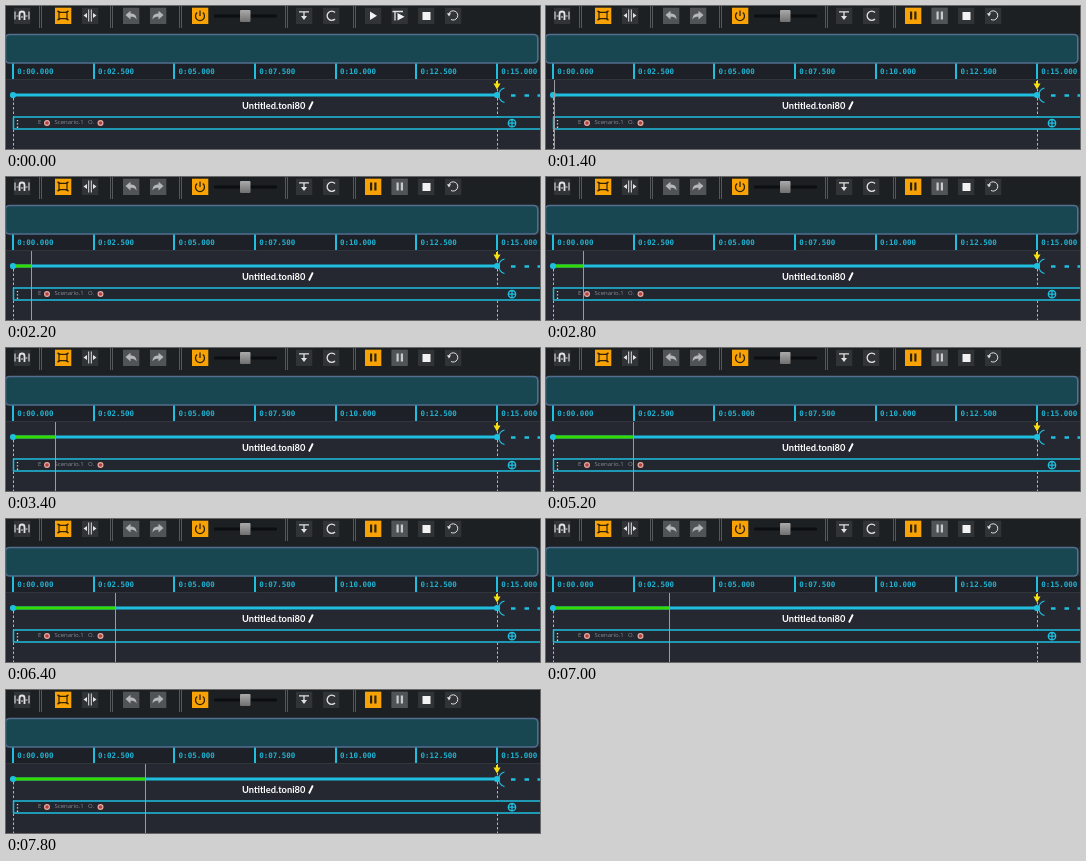
An HTML page for the animation above (8000 ms loop, 534 by 143 pixels).

```html
<!DOCTYPE html>
<html lang="en">
<head>
<meta charset="utf-8">
<title>Timeline playback</title>
<style>
  html, body { margin: 0; width: 100%; height: 100%; overflow: hidden; background: #252831; }
  svg { display: block; width: 534px; height: 143px; }
  .ruler { font: bold 7.5px "DejaVu Sans Mono", monospace; fill: #1fb4d4; }
  .title { font: bold 9.3px Lato, sans-serif; fill: #fff; }
  .tag { font: 6px "Open Sans", sans-serif; fill: #8b8e93; }
  .cyan { stroke: #1fbfe0; fill: none; }
  .light { stroke: #e2e2e2; fill: none; }
  .dark { stroke: #302408; fill: none; }
  .guide { stroke: #b4b7ba; stroke-dasharray: 2.5 2; }
</style>
</head>
<body>
<svg viewBox="0 0 534 143">
  <defs>
    <linearGradient id="knob" x2="0" y2="1">
      <stop stop-color="#aaa"/><stop offset="1" stop-color="#707070"/>
    </linearGradient>
  </defs>

  <rect width="534" height="28" fill="#1c2023"/>
  <g id="separators" stroke="#54585b"></g>
  <g id="buttons"></g>

  <!-- toolbar icons, each centred on its button -->
  <g transform="translate(16 9.5)" class="light">
    <path d="M-2.500 4.500V-1.500a2.500 2.500 0 0 1 5 0V4.500" stroke-width="1.800"/>
    <path d="M-7-4V4M7-4V4M-5.500 0.500h2M3.500 0.500h2M-1 1.500h2" stroke-width="1.100"/>
  </g>
  <g transform="translate(57 9.500)" class="dark">
    <path d="M-4-3.200H4V3.200H-4Z" stroke-width="1.200"/>
    <path d="M-5.500-4.500L-3-3.200M5.500-4.500L3-3.200M-5.500 4.500L-3 3.200M5.500 4.500L3 3.200" stroke-width="1.500"/>
  </g>
  <g transform="translate(84 9.500)">
    <path d="M-1.300-6V6M1.300-6V6" class="light"/>
    <path d="M-3-2.500V2.500L-6.500 0ZM3-2.500V2.500L6.500 0Z" fill="#e2e2e2"/>
  </g>
  <g fill="#b5b7b9">
    <path d="M119.500 9l5-4.200v2.600c4 0 6 2 6 6c-1.500-2.200-3-2.700-6-2.700v2.800Z"/>
    <path d="M157.500 9l-5-4.200v2.600c-4 0-6 2-6 6c1.500-2.200 3-2.700 6-2.700v2.800Z"/>
  </g>
  <path d="M191.200 6.600a4.500 4.500 0 1 0 5.600 0M194 4.500V10" class="dark" stroke-width="1.300"/>
  <rect x="208" y="8.500" width="63" height="3" rx="1" fill="#0c0e10"/>
  <rect x="234" y="4" width="10.500" height="12" rx="1" fill="url(#knob)"/>
  <g transform="translate(298 9.500)">
    <path d="M-5-3.700H5M0-3.700V2" class="light" stroke-width="1.300"/>
    <path d="M-3 0.500H3L0 4.500Z" fill="#e2e2e2"/>
  </g>
  <path d="M329 6.500a4.600 4.600 0 1 0 0 6.500" class="light" stroke-width="1.300"/>
  <rect x="416.500" y="6" width="8" height="8" fill="#f2f2f2"/>
  <g transform="translate(447 9.500)">
    <path d="M-4-2a4.600 4.600 0 1 1 2 6" class="light"/>
    <path d="M-6-2.300H-2L-4 1Z" fill="#e2e2e2"/>
  </g>

  <g id="idle" fill="#f2f2f2">
    <path d="M364 5.500V14L371 9.700Z"/>
    <path d="M391.500 7V14.500L398.500 10.700Z"/>
    <path d="M386.500 5.500H397M389 5.500V14.500" class="light" stroke-width="1.300"/>
  </g>
  <g id="playing">
    <g id="pressed"></g>
    <path d="M364 5.500h2.200v8h-2.200ZM368.300 5.500h2.200v8h-2.200Z" fill="#302408"/>
    <path d="M390.500 5.500h2.200v8h-2.200ZM394.800 5.500h2.200v8h-2.200Z" fill="#c9cbcc"/>
  </g>

  <rect y="57" width="534" height="16.500" fill="#1d2127"/>
  <rect x="-0.500" y="28.500" width="532.300" height="28.500" rx="4" fill="#184751" stroke="#536e8e" stroke-width="1.600"/>
  <path d="M0 73.500H534" stroke="#31353c"/>
  <g id="ruler" class="ruler"></g>

  <path d="M7.500 92V143M491.500 74V143" class="guide"/>
  <rect x="7" y="111" width="527" height="12" fill="#22262e"/>
  <path d="M7 111H534M7 123H534M7.500 111V123" class="cyan" stroke-width="1.500"/>
  <path d="M11.500 114V122" stroke="#d8d8d8" stroke-width="1.300" stroke-dasharray="1.300 2"/>
  <g class="tag">
    <text x="32" y="118">E</text>
    <text x="48.500" y="118">Scenario.1</text>
    <text x="82" y="118">O.</text>
  </g>
  <g fill="#b8403c" stroke="#e3aaa4" stroke-width="1.200">
    <circle cx="41" cy="117" r="2.400"/><circle cx="94.500" cy="117" r="2.400"/>
  </g>
  <path d="M502.300 117.200a3.700 3.700 0 1 0 7.400 0a3.700 3.700 0 1 0-7.400 0H509.700M506 113.500V121" class="cyan" stroke-width="1.300"/>

  <path d="M7 89H491" class="cyan" stroke-width="3"/>
  <path id="elapsed" stroke="#35d900" stroke-width="3"/>
  <path d="M505 89.500h4.500M518.500 89.500h4.500M531.500 89.500h3" class="cyan" stroke-width="2.500"/>
  <path d="M498.500 82a7.500 7.500 0 0 0 0 14.500" class="cyan" stroke-width="1.200"/>
  <g fill="#1fbfe0"><circle cx="7" cy="89" r="3.100"/><circle cx="491" cy="89" r="3.100"/></g>
  <path d="M490 75H492V77.500H494.500L491 83.500L487.500 77.500H490Z" fill="#f6e013"/>

  <text class="title" x="236" y="103.300">Untitled.toni80</text>
  <path d="M303 103.500L306.800 95.500" stroke="#fff" stroke-width="1.800"/>
  <path id="playhead" stroke="#989b9f"/>
</svg>

<script>
const LOOP = 8000, START = 1200, STEP = 200;
const HEAD = [[0, 7], [1, 8.6], [5, 25], [11, 49.5], [15, 66.5], [17, 75],
              [20, 87.5], [23, 99], [26, 109.5], [29, 123], [33, 139.5]];
const ORANGE = '#f9a206', GREY = '#505457', DIM = '#303437';
const byId = id => document.getElementById(id);

function add(parent, tag, attrs, text = '') {
  const el = document.createElementNS('http://www.w3.org/2000/svg', tag);
  for (const key in attrs) el.setAttribute(key, attrs[key]);
  el.textContent = text;
  byId(parent).append(el);
}

function addButton(parent, x, fill) {
  add(parent, 'rect', { x: x - 8, y: 1.7, width: 16.3, height: 16.3, fill });
}

for (const x of [34.5, 105.5, 174.5, 280.5, 348.5])
  add('separators', 'path', { d: `M${x - 1} 0V22M${x + 1} 0V22` });

for (const x of [57, 194]) addButton('buttons', x, ORANGE);
for (const x of [125, 152]) addButton('buttons', x, GREY);
for (const x of [16, 84, 298, 325, 367, 393.5, 420, 447]) addButton('buttons', x, DIM);
addButton('pressed', 367, ORANGE);
addButton('pressed', 393.5, GREY);

for (let i = 0; i < 7; i++) {
  const x = 7 + i * 80.66;
  add('ruler', 'path', { d: `M${Math.round(x)} 57.5V73`, class: 'cyan', 'stroke-width': 2 });
  add('ruler', 'text', { x: x + 4.3, y: 68 }, '0:' + (i * 2.5).toFixed(3).padStart(6, '0'));
}

function headAt(step) {
  const next = Math.max(1, HEAD.findIndex(p => p[0] >= step));
  const [s0, x0] = HEAD[next - 1], [s1, x1] = HEAD[next];
  return x0 + (x1 - x0) * (step - s0) / (s1 - s0);
}

function draw(now) {
  const t = now % LOOP, running = t >= START;
  byId('idle').style.display = running ? 'none' : '';
  for (const id of ['playing', 'elapsed', 'playhead'])
    byId(id).style.display = running ? '' : 'none';
  if (running) {
    const x = headAt(Math.floor((t - START) / STEP));
    byId('elapsed').setAttribute('d', `M7 89H${x}`);
    byId('playhead').setAttribute('d', `M${Math.floor(x) + 0.5} 74V143`);
  }
}

const origin = performance.now();
function tick() {
  draw(performance.now() - origin);
  requestAnimationFrame(tick);
}
tick();
</script>
</body>
</html>
```
